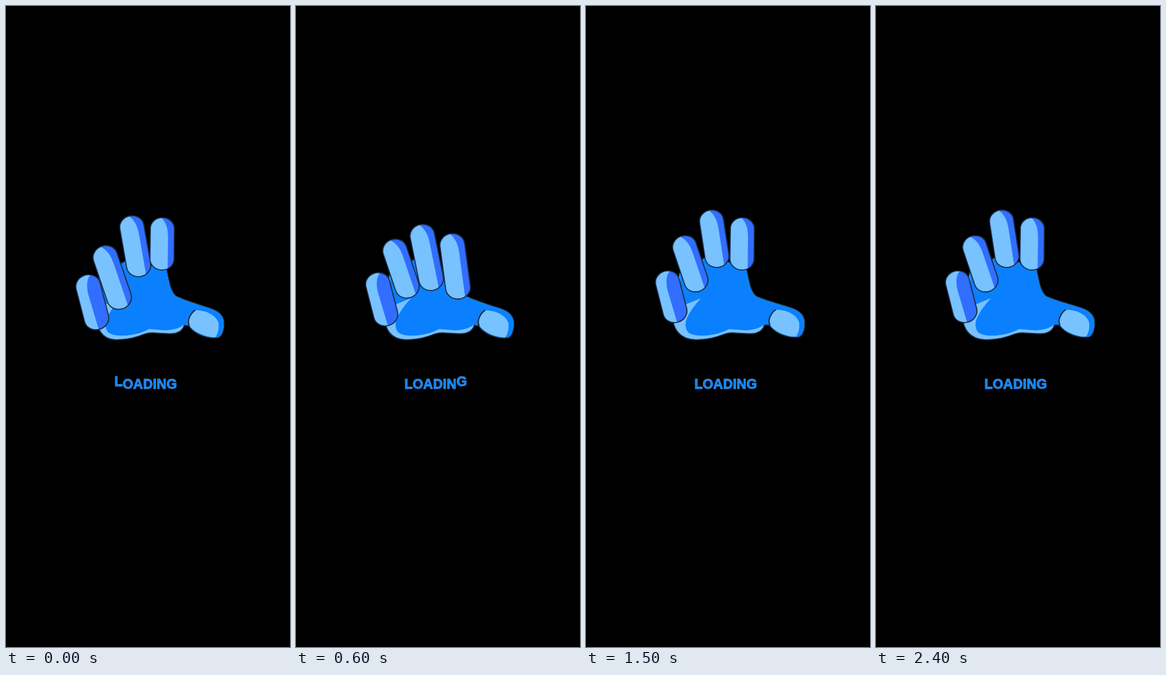
Write an HTML page that moves like this. It is 445 px wide and 1000 px high and loops after 2500 ms.

```html
<!DOCTYPE html>
<html lang="en">
<head>
<meta charset="utf-8">
<title>Loading</title>
<style>
  html, body { margin: 0; width: 100%; height: 100%; overflow: hidden; background: #000; }
  svg { display: block; width: 100%; height: 100%; }
  .line { fill: none; stroke: #1b2b3f; stroke-width: 3.4; stroke-linejoin: round; stroke-linecap: round; }
  .thin { stroke-width: 2; }
  .light { fill: #78c2ff; }
  .shade { fill: #316eff; }
  .palm { fill: #0a80ff; }
  text {
    font: bold 21.3px "Liberation Sans", Arial, sans-serif;
    font-kerning: none;
    fill: #0d80ff;
    stroke: #3c9dff;
    stroke-width: .8;
  }
</style>
</head>
<body>
<svg viewBox="0 0 445 1000">
  <g id="hand"></g>
  <text id="label" x="169.700" y="597">LOADING</text>
</svg>
<script>
const LOOP = 2500, STEP = 100;

// Each finger: top and bottom centres and half width, open and curled.
const FINGERS = [
  { open: [128, 432, 139, 475, 18], shut: [131.5, 452.5, 146.5, 508.5, 19.5], pinky: true },
  { open: [155, 377, 172, 427, 18], shut: [158.5, 424.5, 186.5, 505.5, 19.5] },
  { open: [197, 337, 205, 389, 18], shut: [201.5, 413.5, 226.5, 507.5, 19.5] },
  { open: [245, 349, 244.5, 393, 18], shut: [245.5, 412.5, 267.5, 504.5, 19.5] }
];

// Curl of pinky, ring, middle and index, and the letter that hops.
const POSES = [
  { curl: [.32, .34, .12, 0], hop: 0 },
  { curl: [1, 1, .4, .09], hop: 1 },
  { curl: [1, 1, .68, .52], hop: 2 },
  { curl: [1, 1, .92, .85], hop: 3 },
  { curl: [1, 1, 1, 1], hop: -1 },
  { curl: [.66, .4, .75, .88], hop: 5 },
  { curl: [.15, .12, .3, .4], hop: 6 },
  { curl: [0, 0, 0, 0], hop: -1 }
];

const hand = document.getElementById('hand');
const label = document.getElementById('label');
const path = (cls, d) => `<path class="${cls}" d="${d}"/>`;

function drawFinger({ open, shut, pinky }, curl) {
  const [x1, y1, x2, y2, r] = open.map((v, i) => v + (shut[i] - v) * curl);
  const len = Math.hypot(x2 - x1, y2 - y1);
  const turn = Math.atan2(x1 - x2, y2 - y1) * 180 / Math.PI;
  const cap = r * .9, top = cap - r, base = len + r - cap;
  const box = cls =>
    `<rect class="${cls}" x="${-r}" y="${-r}" width="${2 * r}" height="${len + 2 * r}" rx="${r}" ry="${cap}"/>`;
  // The edge of the lit side meets each rounded end exactly.
  const rim = x => cap * Math.sqrt(1 - (x / r) ** 2);
  const [startX, edgeX, endX] = pinky ? [7, -3, -1] : [-1, 9, 9];
  const start = `${startX} ${top - rim(startX)}`;
  const light = `M${start}C${startX + (edgeX - startX) * .7} -11 ${edgeX} -1 ${edgeX} 12` +
    `L${endX} ${base + rim(endX)}A${r} ${cap} 0 0 1 ${-r} ${base}V${top}A${r} ${cap} 0 0 1 ${start}Z`;
  return `<g transform="translate(${x1} ${y1}) rotate(${turn})">` +
    box('line') + box('shade') + path('light', light) + '</g>';
}

function drawPalm([pinky, ring, middle, index]) {
  const mean = (pinky + ring + middle + index) / 4;
  const pt = (x, y) => `${x + 1 - 5 * mean} ${y + 4.5 * mean} `;
  const left = 417 + 16 * pinky;
  const top = 393 + 17 * ring;
  const side = Math.min(408 + 90 * index, 440);
  const heelX = 137 + 26 * pinky, heelY = 492 + 27 * pinky;

  const upper = `M147 ${left}L187 ${top}L222 ${top + 7}L250 ${side}` +
    `C254 ${side + 12} 255 444 266 453C278 459 ${pt(300, 465)}${pt(319, 471)}` +
    `C${pt(335, 476)}${pt(341, 484)}${pt(341, 494)}C${pt(341, 506)}${pt(337, 516)}${pt(330, 516)}` +
    `C${pt(312, 517)}${pt(293, 508)}${pt(287, 497)}L279 497`;
  const outer = upper + 'Q275 511 256 510.500L236 509.500Q226 508 217 511' +
    `C205 516 190 520 172 520Q${heelX + 6} 519 ${heelX} ${heelY}L140 465Z`;
  const inner = upper + 'Q270 505 250 506L224 504C205 515 170 518 160 509' +
    'Q153 500 158 487Q165 472 180 456L150 468Z';
  const crease = `M${pt(296, 474)}C${pt(290, 478)}${pt(283, 489)}${pt(287, 497)}`;
  const pad = crease + `C${pt(293, 507)}${pt(312, 516)}${pt(328, 516)}` +
    `C${pt(331, 512)}${pt(334, 505)}${pt(333, 494)}C${pt(330, 482)}${pt(313, 473)}${pt(296, 474)}Z`;

  return path('line', outer) + path('light', outer) + path('palm', inner) +
    path('light', pad) + path('line thin', crease);
}

function show({ curl, hop }) {
  hand.innerHTML = drawPalm(curl) + FINGERS.map((f, i) => drawFinger(f, curl[i])).join('');
  const dy = Array(7).fill(0);
  if (hop >= 0) {
    dy[hop] = -4;
    if (hop < 6) dy[hop + 1] = 4;
  }
  label.setAttribute('dy', dy.join(' '));
}

let current = -1;
function frame() {
  const tick = Math.floor(performance.now() % LOOP / STEP);
  // The open hand is held one extra step after the second cycle.
  const pose = (tick > 15 ? tick - 1 : tick) % POSES.length;
  if (pose !== current) show(POSES[current = pose]);
  requestAnimationFrame(frame);
}
frame();
</script>
</body>
</html>
```
